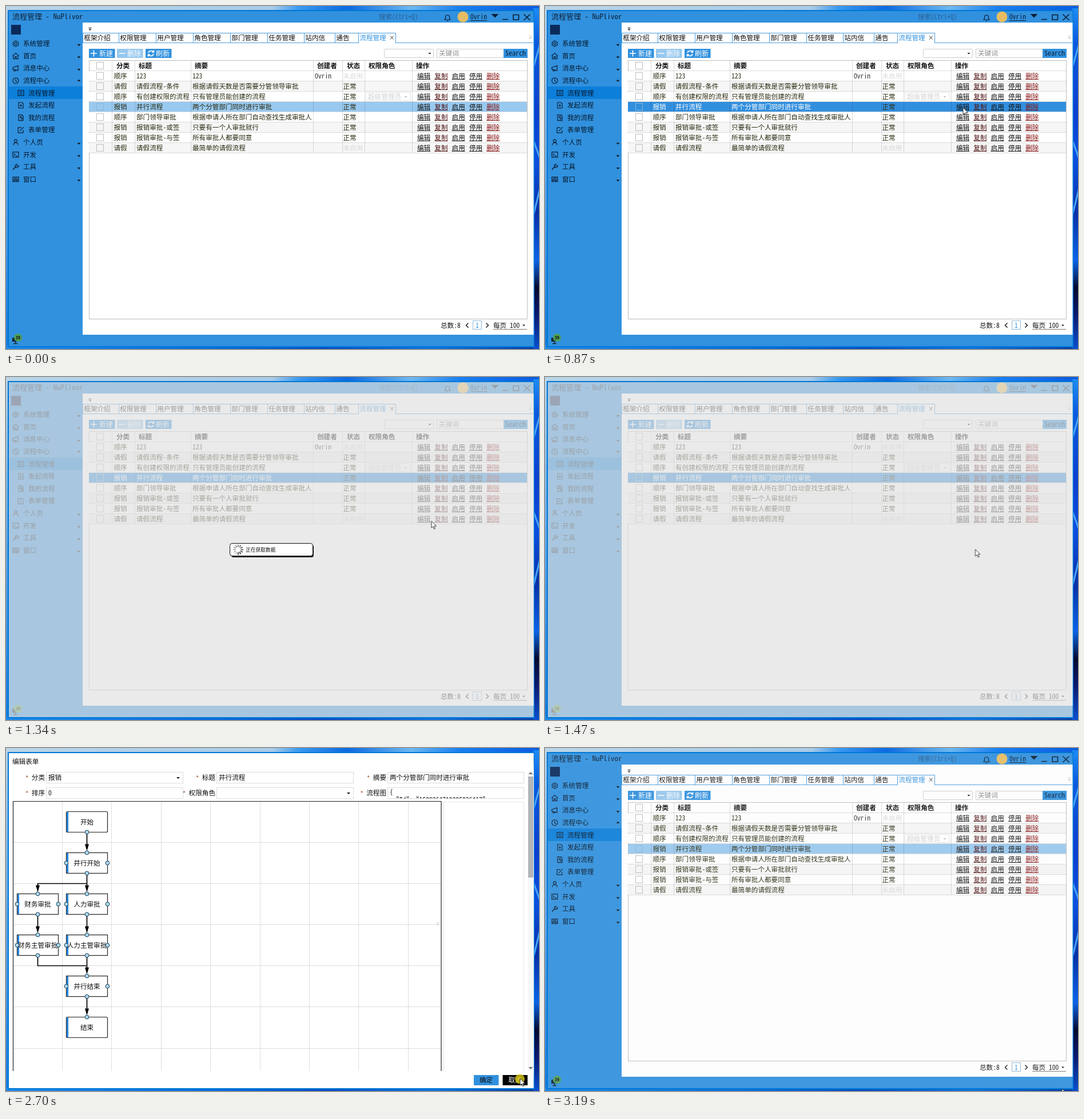
An HTML page that plays this animation: 932x601 px, repeating every 3.26 s.

```html
<!DOCTYPE html>
<html lang="zh-CN">
<head>
<meta charset="utf-8">
<title>流程管理</title>
<style>
html, body { margin: 0; width: 100%; height: 100%; overflow: hidden; background: #fff; }
svg { display: block; width: 932px; height: 601px; }
text {
  font: 11.6px "Noto Sans Mono CJK SC", "Noto Sans CJK SC", "Noto Sans CJK", sans-serif;
  white-space: pre; fill: #111;
}
.ico { fill: none; stroke: #0c1f36; stroke-width: 1.2; }
.anim { animation: 3260ms step-end infinite; }

#cursor { animation-name: move; }
@keyframes move {
  0% { transform: translate(905px, 610px); }
  2.14% { transform: translate(905px, 592px); animation-timing-function: steps(4); }
  10.12% { transform: translate(790px, 270px); animation-timing-function: steps(3); }
  16.25% { transform: translate(745px, 195px); }
  18.4% { transform: translate(743px, 186px); animation-timing-function: steps(4); }
  26.68% { transform: translate(731px, 178px); }
  34.96% { transform: translate(731px, 178px); animation-timing-function: steps(5); }
  45.08% { transform: translate(752.5px, 302px); animation-timing-function: steps(6); }
  57.97% { transform: translate(756px, 369px); animation-timing-function: steps(2); }
  61.96% { transform: translate(796px, 434px); animation-timing-function: steps(5); }
  72.69% { transform: translate(899px, 579px); }
  86.8% { transform: translate(899px, 579px); animation-timing-function: steps(5); }
  97.85% { transform: translate(904px, 597px); }
  100% { transform: translate(905px, 610px); }
}
#spot { animation-name: click; }
@keyframes click { 0% { opacity: 0; } 82.8% { opacity: .78; } 88.9%, 100% { opacity: 0; } }

.hot { animation-name: brush; }
@keyframes brush { 0% { opacity: 1; } 2.14%, 100% { opacity: 0; } }
.hot.long { animation-name: rest; }
@keyframes rest { 0% { opacity: 1; } 4.29%, 100% { opacity: 0; } }
.hot.picked { animation-name: pick; }
@keyframes pick { 0% { opacity: 0; } 20.4% { opacity: 1; } 60%, 100% { opacity: 0; } }

#mask { animation-name: dim; }
@keyframes dim {
  0% { opacity: 0; }
  28.9% { opacity: 0; animation-timing-function: steps(4); }
  36.8% { opacity: .68; }
  91.1% { opacity: .68; animation-timing-function: steps(3); }
  97.85% { opacity: .08; }
  100% { opacity: 0; }
}
#loader { animation-name: load; }
@keyframes load { 0% { opacity: 0; } 30.95% { opacity: 1; } 45.05%, 100% { opacity: 0; } }
#spin { animation: spin 815ms steps(12) infinite; }
@keyframes spin { to { transform: rotate(360deg); } }

#dialog { animation-name: open; }
@keyframes open {
  0% { opacity: 0; }
  45.09% { opacity: 0; animation-timing-function: steps(4); }
  53.6% { opacity: 1; }
  86.8% { opacity: 1; animation-timing-function: steps(2); }
  91.1%, 100% { opacity: 0; }
}
#cancel rect { animation-name: press; }
#cancel text { animation-name: invert; }
@keyframes press { 0% { fill: #3191de; } 72.69%, 100% { fill: #000; } }
@keyframes invert { 0% { fill: #111; } 72.69%, 100% { fill: #fff; } }
</style>
</head>
<body>
<script>
const BLUE = '#3191de', INK = '#0c1f36', BODY = '#2a2a12';

const rect = (x, y, w, h, fill = 'none', more = '') =>
  `<rect x="${x}" y="${y}" width="${w}" height="${h}" fill="${fill}" ${more}/>`;
const frame = (x, y, w, h, color, fill = '#fff', more = '') =>
  rect(x + .5, y + .5, w - 1, h - 1, fill, `stroke="${color}" ${more}`);
const text = (x, y, s, css = '') => `<text x="${x}" y="${y}" style="${css}">${s}</text>`;
const line = (d, color = '#111', w = 1) => `<path d="${d}" fill="none" stroke="${color}" stroke-width="${w}"/>`;
const tri = (x, y, r = 3, up = 1, color = '#111') =>
  `<path d="M${x - r} ${y}h${2 * r}l${-r} ${up * r}z" fill="${color}"/>`;
const icon = (x, y, d) => `<path class="ico" transform="translate(${x} ${y})" d="${d}"/>`;
const group = (attrs, ...parts) => `<g ${attrs}>${parts.join('')}</g>`;
const gradient = (id, vertical, stops) =>
  `<linearGradient id="${id}" x2="${vertical ? 0 : 1}" y2="${vertical ? 1 : 0}">` +
  stops.map(([o, c]) => `<stop offset="${o}" stop-color="${c}"/>`).join('') + '</linearGradient>';

function wallpaper() {
  return '<defs>' +
    gradient('top', 0, [[0, '#bad4e6'], [.5, '#a8cbe8'], [.55, '#3a9af0'], [.64, '#0c6ae0'], [.76, '#6db8f0'], [.85, '#1a80f0'], [1, '#0a5ce0']]) +
    gradient('right', 1, [[0, '#1c8cf5'], [.1, '#0a5ae0'], [.3, '#0b3fd0'], [.45, '#0a50e0'], [.6, '#0830a8'], [.74, '#0b63e8'], [.82, '#050a30'], [.9, '#0a1a70'], [1, '#0a50d0']]) +
    gradient('left', 1, [[0, '#b4d2e8'], [.3, '#7ab6ea'], [1, '#1a7cdc']]) +
    gradient('bottom', 0, [[0, '#1f8aea'], [.4, '#0c6cd8'], [.6, '#0a4cc0'], [.8, '#1474dc'], [1, '#0a3aa0']]) +
    '</defs>' + rect(0, 0, 932, 10, 'url(#top)') + rect(0, 8, 5, 593, 'url(#left)') +
    rect(0, 595, 932, 6, 'url(#bottom)') + rect(922, 4, 10, 597, 'url(#right)') +
    line('M934 66L921 112M921 232L934 268M934 318L921 372', '#45a6f8', 3) +
    rect(3, 7, 921, 591, '#0078d7');
}

function titleBar() {
  return rect(5, 9, 917.5, 587, BLUE) +
    text(11, 23, '流程管理 - NuPlivor', 'font-size:13px;fill:#0c1f36') +
    text(652, 23, '搜索(Ctrl+Q)', 'font-size:11.4px;fill:#2c5f92') +
    icon(772, 21, 'M-5 3H5L3.5 1V-1.5A3.5 3.5 0 0 0-3.5-1.5V1ZM-1.5 5H1.5') +
    '<circle cx="799" cy="19" r="9.5" fill="#e6bd62"/>' +
    text(812, 23, 'Ovrin', 'fill:#0c1f36') + line('M812 25.5h29', INK) + tri(855, 14, 6.5, 1, INK) +
    line('M868 23.5h10M887 15.5h9.5v8.5h-9.5zM905.5 14.5l11 10.5M916.5 14.5l-11 10.5', INK, 1.6) +
    rect(9, 33, 17, 17, '#0b2a5c');
}

function sidebar() {
  const doc = 'M-4-5H2L4-3V5H-4Z';
  const items = [
    ['系统管理', 'M0-5L4.5-2.5V2.5L0 5L-4.5 2.5V-2.5ZM2 0A2 2 0 1 1-2 0A2 2 0 1 1 2 0'],
    ['首页', 'M-5.5 0L0-5L5.5 0M-4-1V5H-1V1H1V5H4V-1'],
    ['消息中心', 'M-5-1.5L4-4.5V4L-5 1.5ZM-3 2V4.5H0V3'],
    ['流程中心', 'M5 0A5 5 0 1 1-5 0A5 5 0 1 1 5 0M0-3V0.5L2.5 2'],
    ['流程管理', 'M-5-4.5H5V4.5H-5ZM-2.5-1.5H2.5M-2.5 1.5H2.5', 1],
    ['发起流程', doc + 'M0-2V3M-2 .5H2', 1],
    ['我的流程', doc + 'M-2-2H2M-2 0H2M0 3L4 1', 1],
    ['表单管理', 'M1-4H-5V5H4V0M-2 2L5-5', 1],
    ['个人页', 'M2.5-2.5A2.5 2.5 0 1 1-2.5-2.5A2.5 2.5 0 1 1 2.5-2.5M-4 5C-4-1 4-1 4 5'],
    ['开发', 'M-5-4.5H5V4.5H-5ZM-3-2L-1 0L-3 2M0 2.5H3'],
    ['工具', 'M-5 5L1-1M-4 3.5L0-.5M5-3A3 3 0 1 1 2-5L2-2H5'],
    ['窗口', 'M-5-4H-1V0H-5ZM1-4H5V0H1ZM-5 2H-1V4H-5ZM1 2H5V4H1Z']
  ];
  return rect(5, 141, 129, 22, '#0c7fda') + items.map(([name, d, sub], i) => {
    const y = 66 + 21.6 * i, mark = i === 3 ? tri(127.5, y + 1, 3, -1) : tri(127.5, y + 1);
    return icon(sub ? 26 : 17, y, d) + text(sub ? 39 : 30, y + 4.2, name, 'fill:#06182c') + (sub ? '' : mark);
  }).join('') +
    rect(11, 581, 11, 7, '#12263c') + line('M16.5 588v3M13 591.5h7', '#12263c', 1.5) +
    '<circle cx="21" cy="581" r="7" fill="#4e9f58"/>' +
    text(17, 583.5, '39', 'font-size:8px;font-weight:700');
}

function tabs() {
  const names = ['框架介绍', '权限管理', '用户管理', '角色管理', '部门管理', '任务管理', '站内信', '通告', '流程管理'];
  const edges = [134, 197, 262, 327, 392, 457, 521, 575, 616, 681];
  const rim = '#4a9cdd';
  return rect(134, 29, 788.5, 547, '#fff') + line('M144.5 38.5h5') + tri(147, 40.5, 2.5) +
    line('M134.5 64V47.5H681.5V64M134 64.5H617M681 64.5H922', rim) +
    names.map((n, i) => {
      const on = i === 8;
      return (on ? '' : line(`M${edges[i + 1] + .5} 48V64`, rim)) +
        text(edges[i] + 2.3, 60, n, on ? 'fill:#3191de' : '');
    }).join('') +
    line('M672 52.5l5.5 6M677.5 52.5l-5.5 6', '#333') + line('M914.5 52.5h5', '#ccc') + tri(917, 55, 3, 1, '#ccc');
}

function toolbar() {
  const button = (x, name, fill) => rect(x, 75, 45.5, 16, fill) + text(x + 18, 87.5, name, 'font-size:12px;fill:#fff');
  return button(145, '新建', BLUE) + button(194, '删除', '#97c8ee') + button(244, '刷新', BLUE) +
    line('M148 83h11M153.5 77.5v11M197.5 83h11', '#fff', 1.6) +
    line('M249 82a5 4.5 0 0 1 9-1.5M258 84a5 4.5 0 0 1-9 1.5M258.5 77.5v3.5h-3.5M248.5 88.5v-3.5h3.5', '#fff', 1.7) +
    frame(661, 75, 87, 16, '#ccc', '#fff', 'rx="1"') + tri(741, 82, 2.5) +
    frame(753, 75, 118, 16, '#ccc') + text(757, 87.3, '关键词', 'fill:#8c8c8c') +
    rect(870, 75, 42, 16, BLUE) + text(873, 87.3, 'Search', 'font-size:12px;fill:#0c1f36');
}

const ROWS = [
  ['顺序', '123', '123'],
  ['请假', '请假流程-条件', '根据请假天数是否需要分管领导审批'],
  ['顺序', '有创建权限的流程', '只有管理员能创建的流程'],
  ['报销', '并行流程', '两个分管部门同时进行审批'],
  ['顺序', '部门领导审批', '根据申请人所在部门自动查找生成审批人'],
  ['报销', '报销审批-或签', '只要有一个人审批就行'],
  ['报销', '报销审批-与签', '所有审批人都要同意'],
  ['请假', '请假流程', '最简单的请假流程']
];
const COLS = [185, 225, 323, 537, 588, 627, 710];

function row(i, bg, color) {
  const top = 114 + 18 * i, y = top + 13, css = `fill:${color}`, off = i === 0 || i === 7;
  const [kind, title, note] = ROWS[i];
  const acts = ['编辑', '复制', '启用', '停用', '删除'].map((s, k) => {
    const x = 719 + 30.3 * k, c = k === 4 ? '#861414' : k === 1 ? '#4f1414' : '#111';
    return text(x, y, s, `fill:${c}`) + line(`M${x} ${top + 14.5}h23`, c);
  }).join('');
  return rect(145, top, 766, 17, bg) +
    frame(158, top + 2, 13, 13, i === 3 || color === '#fff' ? '#8ab5da' : '#bdbdbd', bg) +
    text(188.5, y, kind, css) + text(228, y, title, css) + text(326, y, note, css) +
    (i ? '' : text(540, y, 'Ovrin', 'fill:#333')) +
    text(589.5, y, off ? '未启用' : '正常', `fill:${off ? '#dadada' : BODY}`) +
    (i === 2 ? frame(629, top + 1, 79, 15, '#e4e4e4') + text(633, y, '超级管理员', 'fill:#cfcfcf') + tri(699, top + 8, 2.5, 1, '#bbb') : '') +
    acts;
}

function table() {
  const heads = [[193, '分类'], [232, '标题'], [330, '摘要'], [544, '创建者'], [596, '状态'], [634, '权限角色'], [717, '操作']];
  const hot = (i, at, cls = '') =>
    group(`class="anim hot ${cls}" style="animation-delay:${at ? at - 3260 : 0}ms"`, row(i, i === 3 ? '#328fde' : '#64ade8', '#fff'));
  let grid = '';
  for (let i = 0; i <= 8; i++) grid += `M145 ${113.5 + 18 * i}H911`;
  COLS.forEach(x => grid += `M${x + .5} 96V257`);
  return frame(145, 95, 767, 454, '#bdbdbd') + frame(158, 98, 13, 13, '#bdbdbd') +
    heads.map(([x, s]) => text(x, 108.5, s, 'font-weight:700')).join('') +
    ROWS.map((r, i) => row(i, i === 3 ? '#99c9ef' : i % 2 ? '#f6f6f6' : '#fff', BODY)).join('') +
    hot(7, 396) + hot(5, 463) + hot(4, 529, 'long') + hot(3, 0, 'picked') +
    line(grid, 'rgba(0,0,0,.14)') +
    text(760, 563.5, '总数:8') + line('M808.5 555.5l-4 4 4 4M839.5 555.5l4 4-4 4', '#111', 1.4) +
    frame(816, 551, 16, 16, '#8db9dc') + text(821, 563.5, '1', 'fill:#3191de') +
    text(852, 563.5, '每页 100') + line('M852 566.5h59', '#777') + tri(905.5, 558.5, 2.5);
}

function loader() {
  let spokes = '';
  for (let k = 0; k < 12; k++)
    spokes += `<path d="M0-4.5V-9" stroke="#111" stroke-width="1.6" opacity="${.3 + k * .06}" transform="rotate(${k * 30})"/>`;
  return rect(394, 294, 144, 22, '#000', 'rx="4" opacity=".9"') +
    frame(391, 291, 146, 23, '#111', '#fff', 'rx="4"') +
    group('transform="translate(406 302.5)"', group('id="spin"', spokes)) +
    text(419, 306, '正在获取数据', 'font-size:8.7px;font-weight:500');
}

function field(x, y, w, label, value, combo) {
  const lx = x - 2 - label.length * 11.6;
  return text(lx - 11, y + 14.5, '*', 'fill:#a8552e') + text(lx, y + 14, label) +
    frame(x, y, w, 20, '#dcdcdc') + text(x + 4, y + 14, value) + (combo ? tri(x + w - 9, y + 9) : '');
}

function flow() {
  const A = 141.5, B = 55.5;
  const nodes = [
    [A, 129.5, '开始', 'b'], [A, 201.5, '并行开始', 'lrtb'], [B, 273.5, '财务审批', 'lrtb'], [A, 273.5, '人力审批', 'lrtb'],
    [B, 345.5, '财务主管审批', 'lrtb'], [A, 345.5, '人力主管审批', 'lrtb'], [A, 417.5, '并行结束', 'lrtb'], [A, 489.5, '结束', 't']
  ];
  const side = { l: [-36, 0], r: [36, 0], t: [0, -18], b: [0, 18] };
  let grid = '';
  for (let k = 0; k < 8; k++) grid += `M${98.5 + Math.round(86.4 * k)} 94V566`;
  for (let k = 0; k < 6; k++) grid += `M12 ${165.5 + Math.round(72.1 * k)}H761`;
  let links = `M${A} 219V237.5H${B}V250M${B} 363V381.5H${A}`, heads = '';
  nodes.slice(1).forEach(([x, y]) => {
    const t = y - 18;
    if (t !== 255.5 || x === A) links += `M${x} ${t - 36}V${t - 8}`;
    heads += `<path d="M${x - 3.5} ${t - 15}h7l-3.5 12z"/>`;
  });
  return line(grid, '#dedede') + line('M12.5 566V93.5H761V566', '#222', 1.2) + line(links, '#000', 1.7) + heads +
    nodes.map(([x, y, name]) =>
      rect(x - 36, y - 18, 72, 36, '#fff', `stroke="#222" stroke-width="1.2" rx="${name.length < 3 ? 2 : 0}"`) +
      rect(x - 35.3, y - 17.3, 2.8, 34.6, '#1a7fe0') + text(x, y + 4.3, name, 'text-anchor:middle')).join('') +
    nodes.map(([x, y, , ports]) => [...ports].map(p =>
      `<circle cx="${x + side[p][0]}" cy="${y + side[p][1]}" r="3.4" fill="#a9d9ee" stroke="#1c3a52"/>`).join('')).join('');
}

function dialog() {
  return rect(5, 9, 917.5, 587, '#fff') + text(11, 27.5, '编辑表单') +
    field(70, 42, 240, '分类', '报销', 1) + field(368, 42, 240, '标题', '并行流程') + field(667, 42, 239, '摘要', '两个分管部门同时进行审批') +
    field(70, 69, 240, '排序', '0') + field(368, 69, 240, '权限角色', '', 1) + field(667, 69, 239, '流程图', '') +
    '<clipPath id="cut"><rect x="668" y="70" width="236" height="18.5"/></clipPath>' +
    group('clip-path="url(#cut)"', text(671, 81, '{'), text(682, 94.5, '"Id": "1580264719305826417"')) +
    line('M765.5 566V94.5H905.5V566', '#e6e6e6') + rect(753, 305, 4, 6, '#e9e9e9') + flow() +
    rect(912.5, 40, 10, 526, '#f7f7f7') + rect(913, 50, 9, 177, '#b3b5b8') +
    tri(917.5, 46, 4, -1, '#777') + tri(917.5, 559, 4, 1, '#777') +
    rect(818, 573, 43.5, 18, BLUE) + text(828, 586, '确定') +
    group('id="cancel"', rect(868.5, 573, 43.5, 18, BLUE, 'class="anim"'),
      '<text class="anim" x="878.5" y="586">取消</text>');
}

document.body.innerHTML = `<svg viewBox="0 0 932 601">` +
  wallpaper() + titleBar() + sidebar() + tabs() + toolbar() + table() +
  rect(5, 9, 917.5, 587, '#e0e0e0', 'id="mask" class="anim"') +
  group('id="loader" class="anim"', loader()) +
  group('id="dialog" class="anim"', dialog()) +
  group('id="cursor" class="anim"',
    '<circle id="spot" class="anim" cx="-.5" cy="1" r="8.5" fill="#e2d010"/>',
    '<path d="M0 0V12L2.8 9.5L4.7 13.8L6.6 13L4.7 8.8H8.5Z" fill="#fff" stroke="#222" stroke-width=".9"/>') +
  '</svg>';
</script>
</body>
</html>
```
